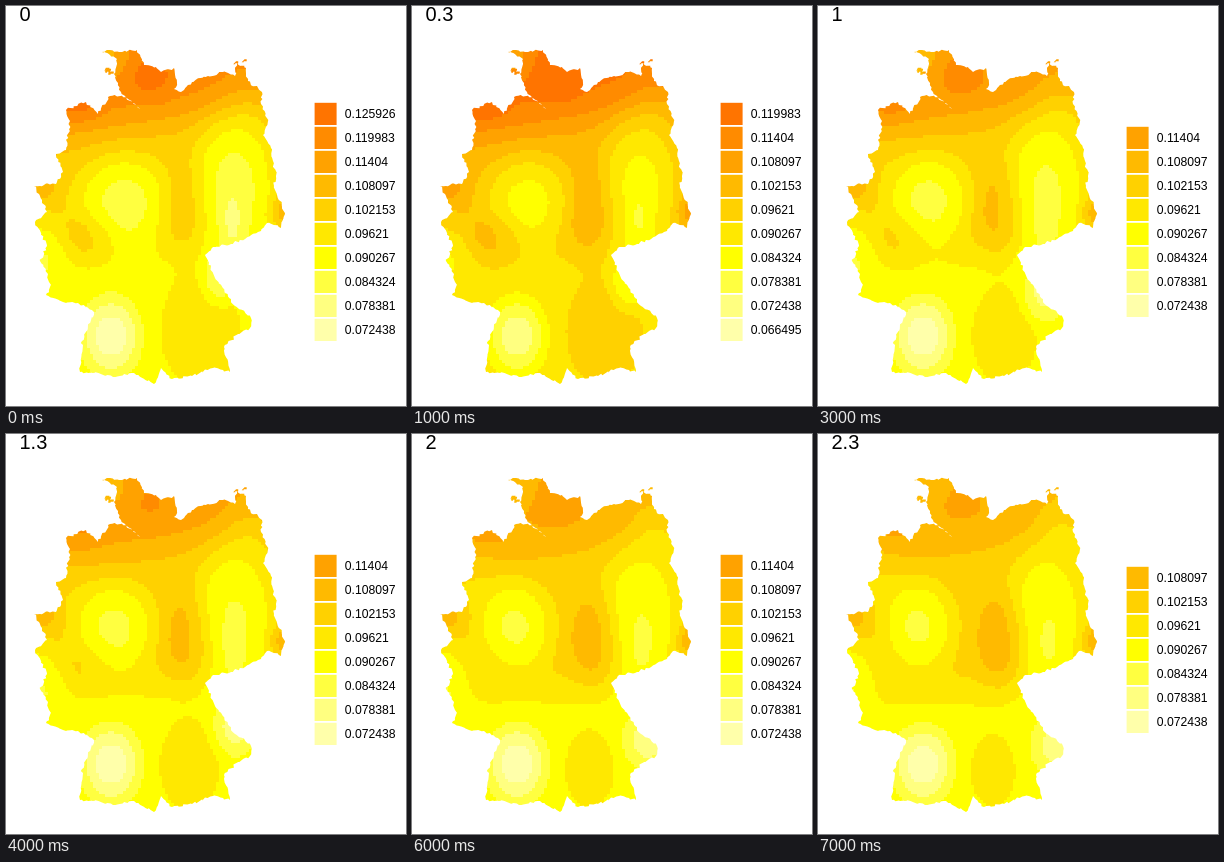
An HTML page that plays this animation: 400 by 400 pixels, repeating every 8000 ms.

```html
<!DOCTYPE html>
<html lang="en">
<head>
<meta charset="utf-8">
<title>Map over time</title>
<style>
html, body { margin: 0; width: 100%; height: 100%; overflow: hidden; background: #fff; }
svg { display: block; width: 100vw; height: 100vh; }
text { font-family: "Liberation Sans", Arial, sans-serif; fill: #000; }
</style>
</head>
<body>
<svg viewBox="0 0 400 400">
  <defs><clipPath id="land"><path id="shape"/></clipPath></defs>
  <g id="map" clip-path="url(#land)" shape-rendering="crispEdges"></g>
  <text id="title" x="13.5" y="15.3" font-size="20"></text>
  <g id="legend" font-size="12.2"></g>
</svg>
<script>
const $ = id => document.getElementById(id);
const CELL = 3, X0 = 24, Y0 = 42, COLS = 87, ROWS = 113, STEP_MS = 1000, END = 2.3;

// Orange to yellow in even steps, then three paler yellows
const COLORS = [
  ...Array.from({ length: 7 }, (_, k) => `rgb(255,${Math.round(116 + 23.18 * k)},0)`),
  '#ffff40', '#ffff80', '#ffffaa'
];
const level = i => +(0.125926 - 0.00594314 * i).toFixed(6);

// time, first legend level, legend size
const STEPS = [[0, 0, 10], [0.3, 1, 10], [0.7, 1, 9], [1, 2, 8],
  [1.3, 2, 8], [1.7, 2, 8], [2, 2, 8], [2.3, 3, 7]];

// Key points of the border, clockwise from the north-west
const NORTH = `96,46 104,44 113,46 131,44 138,59 150,61 155,66 168,62 171,77 168,83 175,86
186,76 202,70 217,66 229,70 231,56 240,62 242,75 256,86`;
const EAST = `255,98 262,115 257,129 265,142 267,155 270,170 268,180 279,208 275,222 261,217
252,226 225,238 207,241 199,249 209,272 229,300 245,312 244,322 232,328 218,341`;
const SOUTH = `224,366 207,362 186,370 166,373 155,362 148,378 128,367 107,371 88,367 74,366
76,335 88,306 72,297 57,296 40,289`;
const WEST = `44,281 42,268 34,255 41,240 29,216 41,206 33,188 28,180 50,178 57,166 50,148
60,144 64,115 60,104 80,96 92,108 104,90 120,91 134,103 115,86 112,77 108,68 111,53 104,49`;

const rise = u => 1 / (1 + Math.exp(-u));
const hill = (dx, dy) => Math.exp(-Math.pow(dx * dx + dy * dy, 1.5));

// Height of the surface: a north-south slope plus drifting hills and hollows
function surface(time) {
  const at = (a, b) => a + (b - a) * time / END;
  const top = at(1.5, 3.15), south = at(240, 259);
  const hills = [
    // x, y, x radius, y radius, height
    [at(118, 100), at(195, 192), at(46, 35), 46, at(2.65, 2.5)],       // centre
    [228, at(182, 186), 40, 78, at(2.7, 2.2)],                         // east
    [at(226, 231), 213, 11, 30, at(0.9, 0.4)],                         // inner east
    [at(179, 184), 205, 25, 45, at(-0.7, -1.6)],                       // ridge between
    [84, 234, 26, 26, at(-1.05, -0.1)],                                // west
    [28, 240, 32, 35, at(1.2, 1.8)],                                   // west border
    [35, 180, 18, 18, -1],
    [50, 140, 35, 35, at(0, 0.8)],
    [280, 206, 16, 16, -1.5],                                          // east corner
    [145, 72, 24, 24, at(-0.8, -0.3)],                                 // north coast
    [72, 98, 24, 18, at(-1, -0.4)],
    [98, 50, 24, 24, at(1.6, 0.7)],
    [250, 85, 32, 32, at(0.5, 1.1)],
    [105, 330, 28, 37, 2.9],                                           // south-west
    [at(195, 175), at(325, 337), at(44, 24), at(62, 38), -1.1],        // south-east
    [at(212, 240), at(275, 312), at(16, 26), at(24, 28), at(1.5, 1.9)]
  ];
  return (x, y) => hills.reduce(
    (v, [hx, hy, rx, ry, h]) => v + h * hill((x - hx) / rx, (y - hy) / ry),
    top + (4.6 - top) * rise((y - 130 + 0.17 * (x - 60)) / 12) + 1.9 * rise((y - south) / 12));
}

// One path per colour, made of horizontal runs of cells
function bands(time, shift) {
  const d = COLORS.map(() => ''), height = surface(time);
  const band = (c, r) => {
    const v = height(X0 + (c + 0.5) * CELL, Y0 + (r + 0.5) * CELL) - shift;
    return Math.max(0, Math.min(9, Math.floor(v)));
  };
  for (let r = 0; r < ROWS; r++) {
    const row = Array.from({ length: COLS }, (_, c) => band(c, r));
    for (let c = 0; c < COLS;) {
      const k = row[c], from = c;
      while (row[c] === k) c++;
      const w = (c - from) * CELL;
      d[k] += `M${X0 + from * CELL} ${Y0 + r * CELL}h${w}v${CELL}h${-w}z`;
    }
  }
  return d.map((p, k) => `<path fill="${COLORS[k]}" d="${p}"/>`).join('');
}

function legend(first, size) {
  const top = 216 - 12 * size;
  return Array.from({ length: size }, (_, i) => {
    const y = top + i * 24;
    return `<rect x="308.6" y="${y + 0.8}" width="22" height="22.2" fill="${COLORS[10 - size + i]}"/>` +
      `<text x="338.8" y="${y + 16}">${level(first + i)}</text>`;
  }).join('');
}

let seed = 7;
const rand = () => (seed = seed * 16807 % 2147483647) / 2147483647;
const jitter = size => (rand() * 2 - 1) * size;

// Ragged border: short steps with a little seeded noise
function ragged(text) {
  const pts = text.trim().split(/\s+/).map(p => p.split(',').map(Number));
  return 'M' + pts.flatMap(([x, y], i) => {
    const [u, v] = pts[(i + 1) % pts.length];
    const n = Math.max(1, Math.round(Math.hypot(u - x, v - y) / 2.5));
    return Array.from({ length: n }, (_, k) => [
      x + (u - x) * k / n + (k ? jitter(1.3) : 0),
      y + (v - y) * k / n + (k ? jitter(1.3) : 0)
    ].map(q => q.toFixed(1)).join(' '));
  }).join('L') + 'z';
}

// Small islands scattered around a point
function islets(x, y, spread, count) {
  return Array.from({ length: count }, () =>
    `M${x + jitter(spread)} ${y + jitter(spread)}h${2 + rand() * 3}v2h-3v1h-2z`).join('');
}

$('shape').setAttribute('d', ragged([NORTH, EAST, SOUTH, WEST].join(' ')) +
  islets(101, 62, 4, 6) + islets(235, 58, 5, 4));

const scenes = STEPS.map(([time, first, size]) => ({
  title: time,
  map: bands(time, first + size - 10),
  legend: legend(first, size)
}));
let shown = -1;

function draw(ms) {
  const i = Math.floor(ms / STEP_MS) % scenes.length;
  if (i === shown) return;
  shown = i;
  $('title').textContent = scenes[i].title;
  $('map').innerHTML = scenes[i].map;
  $('legend').innerHTML = scenes[i].legend;
}

draw(0);
const start = performance.now();
(function tick() {
  draw(Math.max(0, performance.now() - start));
  requestAnimationFrame(tick);
})();
</script>
</body>
</html>
```
